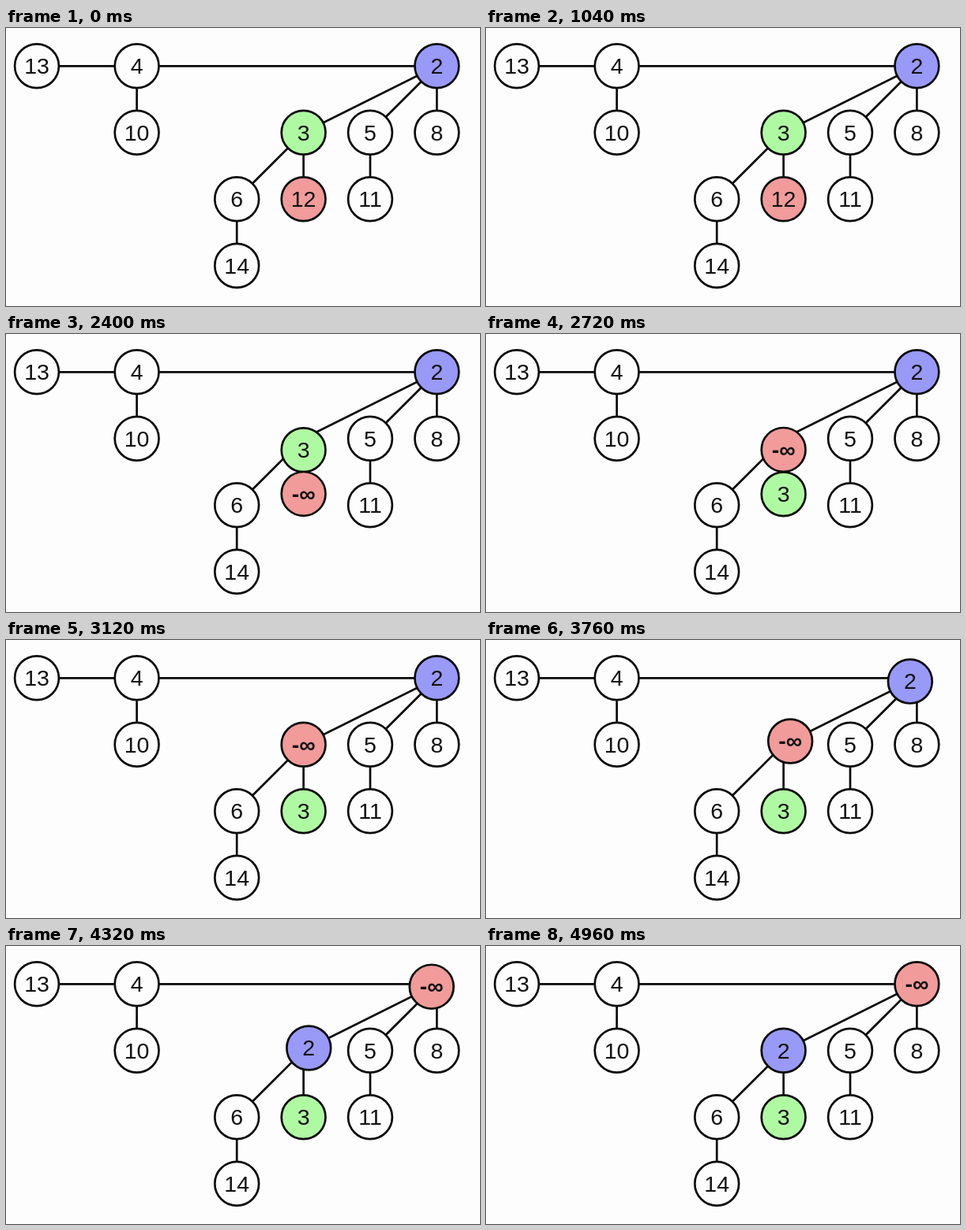
An HTML page for the animation above (5000 ms loop, 600 px wide and 353 px high).

```html
<!DOCTYPE html>
<html lang="en">
<head>
<meta charset="utf-8">
<title>Heap: decrease key</title>
<style>
  html, body { margin: 0; width: 100%; height: 100%; overflow: hidden; background: #fefdfe; }
  svg { display: block; width: 100%; height: 100%; }
  circle, line { stroke: #0b0b0b; stroke-width: 2.7; }
  text { font: 28.5px "Liberation Sans", Arial, sans-serif; text-anchor: middle; fill: #111; }
  .key { font-weight: bold; }
</style>
</head>
<body>
<svg viewBox="0 0 600 353" id="stage"></svg>
<script>
const LOOP = 5000;
const SWAP = 820;
const R = 27.9;
const WHITE = '#fefdfe', BLUE = '#9999f8', GREEN = '#b0f9a3', RED = '#f19b9b';

const stage = document.getElementById('stage');

function add(parent, tag, attrs, content) {
  const el = document.createElementNS('http://www.w3.org/2000/svg', tag);
  for (const name in attrs) el.setAttribute(name, attrs[name]);
  if (content) el.textContent = content;
  return parent.appendChild(el);
}

const at = (col, row) => [39 + col * 42.2, 48.3 + row * 84.5];
const spots = {
  13: at(0, 0), 4: at(3, 0), 2: at(12, 0),
  10: at(3, 1), 3: at(8, 1), 5: at(10, 1), 8: at(12, 1),
  6: at(6, 2), 12: at(8, 2), 11: at(10, 2), 14: at(6, 3)
};
const edges = [[13, 4], [4, 2], [4, 10], [2, 3], [2, 5], [2, 8], [3, 6], [3, 12], [5, 11], [6, 14]];

for (const [a, b] of edges) {
  const [x1, y1] = spots[a], [x2, y2] = spots[b];
  add(stage, 'line', { x1, y1, x2, y2 });
}

function place(node, [x, y]) {
  node.setAttribute('transform', `translate(${x} ${y})`);
}

function addNode(id, fill = WHITE) {
  const node = add(stage, 'g', {});
  add(node, 'circle', { r: R, fill });
  const label = add(node, 'text', { y: 9.7 }, String(id));
  place(node, spots[id]);
  return { node, label };
}

[13, 4, 10, 5, 8, 6, 11, 14].forEach(id => addNode(id));
const green = addNode(3, GREEN).node;
const blue = addNode(2, BLUE).node;
const { node: red, label: oldKey } = addNode(12, RED);
const newKey = add(red, 'text', { class: 'key' }, '-∞');

const clamp = v => Math.min(1, Math.max(0, v));
const mix = (a, b, p) => a.map((v, i) => v + (b[i] - v) * p);
const bezier = (a, b, u) => 3 * a * u * (1 - u) ** 2 + 3 * b * u * u * (1 - u) + u ** 3;

// Same curve as the CSS "ease" keyword
function ease(p) {
  if (p <= 0 || p >= 1) return clamp(p);
  let lo = 0, hi = 1;
  for (let i = 0; i < 24; i++) {
    const mid = (lo + hi) / 2;
    if (bezier(0.25, 0.25, mid) < p) lo = mid; else hi = mid;
  }
  return bezier(0.1, 1, lo);
}

function draw(t) {
  const first = ease((t - 2284) / SWAP);
  const second = ease((t - 3706) / SWAP);

  oldKey.setAttribute('opacity', 1 - clamp((t - 1260) / 290));
  newKey.setAttribute('opacity', clamp((t - 1560) / 250));
  newKey.setAttribute('y', 9.7 + 10 * clamp((1820 - t) / 140));

  place(green, mix(spots[3], spots[12], first));
  place(blue, mix(spots[2], spots[3], second));
  place(red, second > 0 ? mix(spots[3], spots[2], second) : mix(spots[12], spots[3], first));
}

const start = performance.now();
function tick() {
  draw((performance.now() - start) % LOOP);
  requestAnimationFrame(tick);
}
draw(0);
requestAnimationFrame(tick);
</script>
</body>
</html>
```
